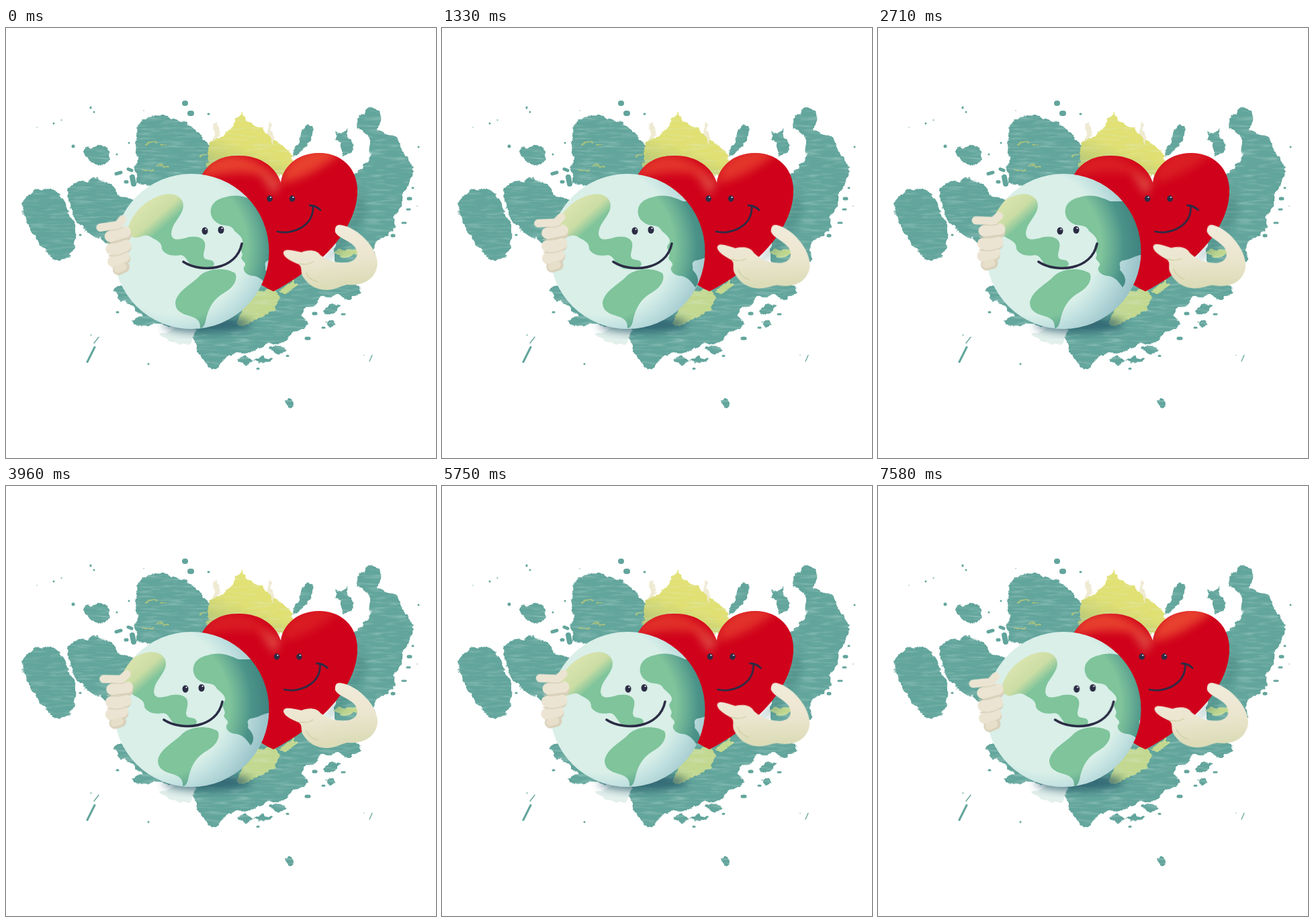
An HTML page without scripts for the animation above (7620 ms loop, 640 by 640 pixels).

```html
<!DOCTYPE html>
<html lang="en">
<head>
<meta charset="utf-8">
<title>Earth and heart</title>
<style>
html, body { margin: 0; width: 100%; height: 100%; overflow: hidden; background: #fff; }
svg { display: block; width: 100%; height: 100%; }
.dots { fill: none; stroke: #62a59c; stroke-linecap: round; }
.line { fill: none; stroke: #2b2c45; stroke-linecap: round; stroke-linejoin: round; }
.land, .smile, .grin { animation: land 7620ms linear infinite; }
.smile { animation-name: smile; }
.grin { animation-name: grin; }
.glow { animation: glow 7620ms ease-in-out infinite; }
.point { transform-origin: 497px 300px; animation: point 1524ms linear infinite; }
.hug { transform-origin: 205px 322px; animation: hug 1270ms linear infinite; }
@keyframes land {
  0% { transform: translateX(0); }
  9% { transform: translateX(-6px); }
  17.45% { transform: translateX(-13px); }
  26.5% { transform: translateX(-20.5px); }
  35.56% { transform: translateX(-26px); }
  44% { transform: translateX(-27.5px); }
  51.97% { transform: translateX(-26px); }
  64% { transform: translateX(-18px); }
  75.46% { transform: translateX(-10px); }
  82% { transform: translateX(-4.5px); }
  88.58% { transform: translateX(0); }
  95% { transform: translateX(2.5px); }
  99.5%, 100% { transform: translateX(3px); }
}
@keyframes smile {
  0%, 100% { transform: translateX(0); }
  8.7% { transform: translateX(-3.5px); }
  17.45% { transform: translateX(-9px); }
  26.5% { transform: translateX(-17.5px); }
  35.56% { transform: translateX(-25px); }
  44% { transform: translateX(-28.5px); }
  51.97% { transform: translateX(-29px); }
  64% { transform: translateX(-25.5px); }
  75.46% { transform: translateX(-19px); }
  82% { transform: translateX(-13px); }
  88.58% { transform: translateX(-8px); }
  94% { transform: translateX(-4px); }
}
@keyframes grin {
  0%, 100% { transform: translateX(0); }
  8.7% { transform: translateX(1.6px); }
  17.45% { transform: translateX(4px); }
  35.56% { transform: translateX(8.5px); }
  45% { transform: translateX(10.2px); }
  51.97% { transform: translateX(10.5px); }
  64% { transform: translateX(9px); }
  75.46% { transform: translateX(6.5px); }
  88.58% { transform: translateX(2.8px); }
}
@keyframes glow {
  0%, 100% { opacity: .9; }
  45% { opacity: .35; }
}
@keyframes point {
  0%, 100% { transform: rotate(.3deg); }
  8% { transform: rotate(-2.8deg); }
  17% { transform: rotate(-5.8deg); }
  26% { transform: rotate(-7.8deg); }
  35% { transform: rotate(-8.5deg); }
  42.9% { transform: rotate(-7.4deg); }
  51% { transform: rotate(-4deg); }
  59.8% { transform: rotate(0); }
  69% { transform: rotate(4.3deg); }
  77.5% { transform: rotate(6.5deg); }
  83% { transform: rotate(6.9deg); }
  87.3% { transform: rotate(6.1deg); }
  97.4% { transform: rotate(2.4deg); }
}
@keyframes hug {
  0%, 100% { transform: rotate(.8deg); }
  4.7% { transform: rotate(6.5deg); }
  12.6% { transform: rotate(10.2deg); }
  21% { transform: rotate(15deg); }
  31.5% { transform: rotate(17deg); }
  42% { transform: rotate(15deg); }
  52.8% { transform: rotate(11deg); }
  75% { transform: rotate(6.5deg); }
  96.9% { transform: rotate(3.3deg); }
}
</style>
</head>
<body>
<svg viewBox="0 0 640 640">
  <defs>
    <filter id="rough" x="0" y="0" width="640" height="640" filterUnits="userSpaceOnUse" color-interpolation-filters="sRGB">
      <feTurbulence type="fractalNoise" baseFrequency=".08" numOctaves="3" seed="4" result="n"/>
      <feDisplacementMap in="SourceGraphic" in2="n" scale="10" xChannelSelector="R" yChannelSelector="G" result="s"/>
      <feTurbulence type="fractalNoise" baseFrequency=".03 .25" numOctaves="3" seed="9"/>
      <feColorMatrix values="0 0 0 0 .88  0 0 0 0 .95  0 0 0 0 .93  .7 0 0 0 -.33"/>
      <feComposite in2="s" operator="in" result="t"/>
      <feMerge><feMergeNode in="s"/><feMergeNode in="t"/></feMerge>
    </filter>
    <filter id="soft" x="-40%" y="-40%" width="180%" height="180%"><feGaussianBlur stdDeviation="7"/></filter>
    <clipPath id="disc"><circle cx="276" cy="332.5" r="115.5"/></clipPath>
    <clipPath id="heartClip"><use href="#heart"/></clipPath>
    <path id="heart" d="M409 230C412 208 432 186 467 186C503 187 524 212 523 245C521 300 470 354 398 392C350 370 280 300 290 222C300 200 322 189 347 190C380 190 402 208 409 230Z"/>
    <radialGradient id="sea" gradientUnits="userSpaceOnUse" cx="250" cy="318" r="165">
      <stop offset=".66" stop-color="#d9efe8"/><stop offset=".78" stop-color="#c3e2e1"/><stop offset="1" stop-color="#9cc5cb"/>
    </radialGradient>
    <radialGradient id="green" gradientUnits="userSpaceOnUse" cx="250" cy="325" r="165">
      <stop offset=".66" stop-color="#7fc49b"/><stop offset=".76" stop-color="#67ad94"/><stop offset=".86" stop-color="#4b9389"/><stop offset="1" stop-color="#418480"/>
    </radialGradient>
    <linearGradient id="north" gradientUnits="userSpaceOnUse" x1="195" y1="243" x2="250" y2="306">
      <stop offset=".3" stop-color="#d8e3ad"/><stop offset=".58" stop-color="#cbdda4"/><stop offset=".8" stop-color="#7fc49b"/>
    </linearGradient>
    <linearGradient id="yellow" x1="0" y1="1" x2=".5" y2="0">
      <stop offset="0" stop-color="#a7bf7c"/><stop offset=".55" stop-color="#dfdf72"/><stop offset="1" stop-color="#e3e276"/>
    </linearGradient>
    <linearGradient id="skin" x1="0" y1="0" x2=".2" y2="1">
      <stop offset="0" stop-color="#f2ecdd"/><stop offset=".6" stop-color="#ece6d0"/><stop offset="1" stop-color="#dcdcb8"/>
    </linearGradient>
    <g id="eye">
      <ellipse rx="4.5" ry="5.6" fill="#2b2c45"/><circle cx="1.5" cy="-2.4" r="1.1" fill="#fff"/>
    </g>
  </defs>

  <g filter="url(#rough)">
    <g fill="#62a59c">
      <path d="M23 263C27 247 48 238 70 240C85 246 94 270 104 298C106 322 99 344 82 347C62 341 50 324 40 308C30 292 24 280 23 263Z"/>
      <path d="M91 240C100 224 115 230 135 224C155 228 163 240 170 253L200 258L190 335L165 330C148 316 125 308 108 294C99 276 92 258 91 240Z"/>
      <path d="M115 186C124 173 140 170 152 180C156 194 150 204 142 207C132 205 124 198 115 186Z"/>
      <path d="M192 232L194 190L190 172L196 148C206 128 230 126 252 136C272 140 292 154 302 176L304 215L240 240Z"/>
      <path d="M440 152L449 142L458 150L453 167L444 181L428 192L427 184L437 170Z"/>
      <path d="M488 166L493 155L501 157L507 148L511 164L520 174L514 186L502 188L496 172Z"/>
      <path d="M522 139L529 128L541 118L556 122L558 137L553 150L563 159L580 160L588 178L598 193L606 208L602 230L591 244L589 266L579 277L577 299L562 312L548 318L550 345L525 372L490 360V300L510 240L525 210L540 198L543 178L537 157L524 149Z"/>
      <path d="M268 440L282 468L290 490L306 508L317 505L326 490L346 483L364 484L386 470L412 468L430 454L452 440L440 430L446 418L464 410L470 400L495 398L512 404L531 393L515 374L470 360L380 380L290 420Z"/>
      <path d="M159 388L176 384L205 415L260 444L225 442L190 440L188 434L204 430L184 410L170 407Z"/>
      <path d="M344 493L356 488L366 495L357 504ZM392 477L404 471L417 478L405 485ZM472 420L486 410L499 413L488 425L475 427ZM475 437L487 434L491 441L480 443ZM366 494L384 489L396 493L380 500ZM415 552L425 552L430 562L423 565L417 560Z"/>
    </g>
    <path d="M252 446L285 448L274 470L247 467L228 455Z" fill="#e3f0ec"/>
    <path d="M299 214L301 178L307 164L321 162L335 151L343 132L351 126L358 139L380 148L394 163L411 174L427 190L428 222Z" fill="url(#yellow)"/>
    <path d="M307 170L309 151L314 139L320 158ZM389 160L393 139L399 160L398 173Z" fill="#f0ead2"/>
    <path d="M208 172l17-2M228 174l12-1M202 214l20-4M225 205l18 3M287 190l12-2" stroke="#a9c279" stroke-width="2"/>
    <path d="M345 441L355 407L375 390L400 388L408 403L400 419L375 433L351 445ZM408 391L430 372L434 383L416 395ZM486 333L530 327L534 335L500 342Z" fill="#c2d88f"/>
  </g>
  <g class="dots">
    <path stroke-width="8" d="M266 112h1M274 127h2M188 222l2 10"/>
    <path stroke-width="5" d="M100 176h0M164 217l7-2M178 229h2M599 254h3M575 309h2M182 210l5 2M447 462h4M458 425h3"/>
    <path stroke-width="3" d="M132 475l-11 22M71 142h0M126 118v1M131 125h0M614 177h0M212 500h0M110 308h1M165 188h0M183 171h0M301 128h1M597 270h4M590 290h5M471 446h3M418 488h2M374 507h2M437 441h7M500 426h4M165 423h2M605 238h1"/>
    <path stroke-width="1.3" d="M46 148h0M82 137h1M138 460l-7 9M545 487l-4 9M533 487h0M205 123h0M612 265h0M126 457h1"/>
  </g>

  <!-- heart -->
  <path d="M526 238C522 305 475 345 430 382L500 330L535 270Z" fill="#2c6b69" opacity=".45" filter="url(#soft)"/>
  <use href="#heart" fill="#d0021b"/>
  <g clip-path="url(#heartClip)">
    <path class="glow" filter="url(#soft)" d="M286 225C300 180 360 172 409 230C410 196 450 166 500 184C476 205 446 224 411 231C376 210 330 212 286 225Z" fill="#ea4a33"/>
    <path filter="url(#soft)" d="M376 213L408 230L399 250Z" fill="#ef9a70" opacity=".5"/>
  </g>
  <g class="grin">
    <use href="#eye" transform="translate(392.5 254) scale(.95 .85)"/>
    <use href="#eye" transform="translate(426 254) scale(.95 .85)"/>
    <path class="line" stroke-width="2.8" d="M404 303C425 308 457 296 457 267M452 264Q461 264 468 271"/>
  </g>

  <!-- earth -->
  <ellipse cx="300" cy="441" rx="66" ry="12" fill="#1f4f63" opacity=".75" filter="url(#soft)"/>
  <g clip-path="url(#disc)">
    <g class="land" fill="url(#green)">
      <path fill="url(#sea)" d="M120 200H460V460H120Z"/>
      <path fill="url(#north)" d="M180 306C183 278 212 249 242 247C260 247 268 260 262 273C256 286 247 292 246 306C247 317 256 315 266 313C280 308 294 311 296 320C298 330 290 339 297 344C303 346 308 344 310 351C309 358 297 361 283 358C270 353 270 339 260 338C248 340 237 338 232 329C232 319 226 317 217 312C207 304 201 313 190 312Z"/>
      <path d="M252 408C256 390 276 382 288 369C301 357 327 356 341 365C346 374 338 387 325 394C307 404 301 420 298 432C296 442 294 446 289 447C290 434 282 431 268 427C256 423 252 417 252 408Z"/>
      <path d="M305 277C303 263 312 255 326 252C345 246 358 252 372 258L440 258V338C412 333 407 344 390 346C382 350 388 354 386 360C396 370 396 379 390 386C384 378 380 371 369 369C359 369 352 362 354 356C360 350 352 348 350 342C356 334 344 329 350 322C356 315 348 309 340 302C335 291 324 296 316 291C309 287 306 282 305 277Z"/>
    </g>
  </g>
  <g class="smile">
    <use href="#eye" transform="translate(296 302)"/>
    <use href="#eye" transform="translate(320 300.5)"/>
    <path class="line" stroke-width="3.6" d="M264 348C290 365 343 361 351 321"/>
  </g>

  <!-- hands -->
  <g class="hug" fill="none" stroke-linecap="round">
    <path stroke="#d9d0ba" stroke-width="17" d="M160 313L178 309M160 332L178 327M162 349L177 344M168 360L176 356"/>
    <path stroke="#ece4d2" stroke-width="12" d="M140 298L166 294L173 285"/>
    <path stroke="#ece4d2" stroke-width="17" d="M155 311L177 304M157 330L178 324M160 348L176 341"/>
    <path stroke="#e7dfc9" stroke-width="11" d="M167 360L175 356"/>
    <path stroke="#d6ccb5" stroke-width="1.3" d="M152 302Q165 302 174 297M150 321Q166 322 178 314M153 340Q167 341 179 334"/>
  </g>
  <g class="point">
    <path fill="url(#skin)" d="M497 293C525 296 555 330 553 352C550 378 525 384 508 382C498 384 490 390 478 390C462 390 450 383 442 370C438 362 442 357 436 352C426 348 413 342 413 335C414 328 425 331 440 334C450 330 462 330 468 338C478 346 490 350 506 349C522 348 528 336 518 324C510 316 494 312 490 304C489 296 492 293 497 293Z"/>
    <path d="M437 351Q448 354 457 348M447 365Q452 375 464 378" fill="none" stroke="#cfd0a6" stroke-width="1.5" stroke-linecap="round"/>
  </g>
</svg>
</body>
</html>
```
